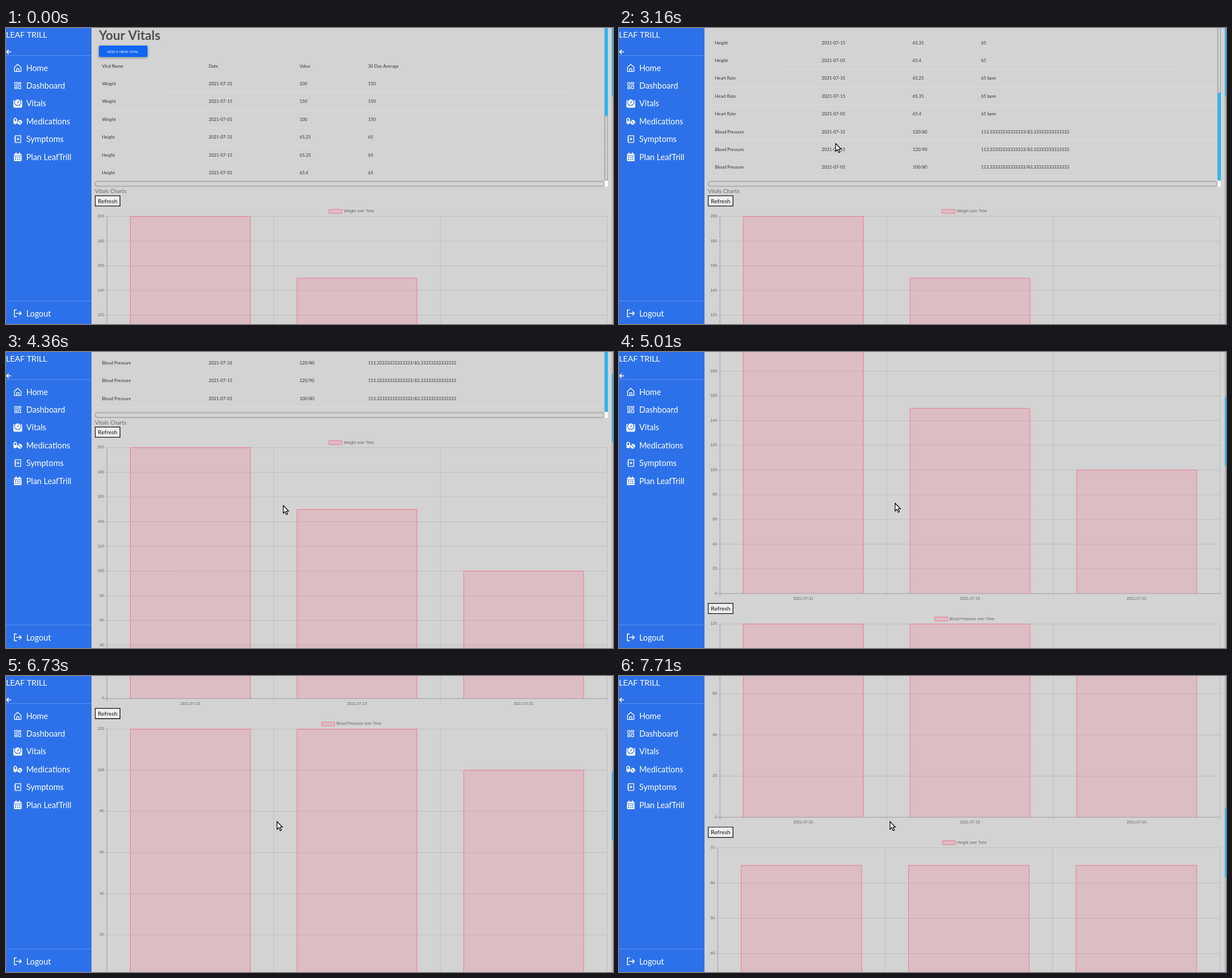
An HTML page with a canvas for the animation above (8000 ms loop, 1072 by 522 pixels).

```html
<!DOCTYPE html>
<html lang="en">
<head>
<meta charset="utf-8">
<title>Vitals</title>
<style>
html, body { margin: 0; width: 100%; height: 100%; overflow: hidden; background: #d3d3d3; }
canvas { display: block; }
</style>
</head>
<body>
<canvas id="stage" width="1072" height="522"></canvas>
<script>
const ctx = document.getElementById('stage').getContext('2d');
const LOOP = 8000, TICK = 66, NOTCH = 56, LIST_END = 198;
const BLUE = '#2d71ea', CYAN = '#29b8f2', PINK = '#f2708c', TINT = 'rgba(255,99,132,.2)', W = '#fff';
const UI = 'Lato, "Open Sans", sans-serif', CHART = '"Liberation Sans", Arial, sans-serif';

// Wheel turns: start, end, notches
const listWheel = [[2090, 2430, 2], [2630, 3160, 2]];
const pageWheel = [[3740, 5005, 6], [5005, 5110, 1], [5680, 6108, 3], [6265, 6730, 3], [7120, 7710, 5]];
// Pointer moves: start, end, x, y
const pointerStart = [1022, 503];
const pointerMoves = [[198, 960, 578, 275], [1023, 1490, 388, 204], [1700, 1960, 390, 199],
  [2430, 3160, 382, 203], [3310, 3800, 489, 270], [4360, 5010, 487, 266],
  [5280, 5540, 492, 264], [6140, 6730, 478, 256]];

const rows = [
  ['Weight', [200, 150, 100], '150'],
  ['Height', [65.25, 65.35, 65.4], '65'],
  ['Heart Rate', [65.25, 65.35, 65.4], '65 bpm'],
  ['Blood Pressure', ['120/80', '120/90', '100/80'], '113.33333333333333/83.33333333333333']
];
const dates = ['2021-07-31', '2021-07-15', '2021-07-01'];
const columns = [169.5, 358, 518.5, 639.5];
const charts = [
  ['Weight over Time', 178.3, 200, 20, [200, 150, 100]],
  ['Blood Pressure over Time', 178.3, 120, 20, [120, 120, 100]],
  ['Height over Time', 174.3, 70, 10, [65, 65, 65]]
];
const menu = ['Home', 'Dashboard', 'Vitals', 'Medications', 'Symptoms', 'Plan LeafTrill'];

const progress = (t, start, end) => Math.min(1, Math.max(0, (t - start) / (end - start)));
const scrolled = (wheel, t) =>
  wheel.reduce((sum, [start, end, n]) => sum + n * NOTCH * progress(t, start, end), 0);
const pointer = t => pointerMoves.reduce(([px, py], [start, end, x, y]) => {
  const f = progress(t, start, end);
  return [px + (x - px) * f, py + (y - py) * f];
}, pointerStart);

// y is the middle of the capitals
function text(str, x, y, size, color, { weight = 400, font = UI, align = 'left' } = {}) {
  ctx.font = `${weight} ${size}px ${font}`;
  ctx.fillStyle = color;
  ctx.textAlign = align;
  ctx.fillText(str, x, y + size * .36);
}

function box(x, y, w, h, fill, r = 0) {
  ctx.fillStyle = fill;
  ctx.beginPath();
  ctx.roundRect(x, y, w, h, r);
  ctx.fill();
}

function path(d, stroke, width, fill) {
  const p = new Path2D(d);
  if (fill) { ctx.fillStyle = fill; ctx.fill(p); }
  if (stroke) { ctx.strokeStyle = stroke; ctx.lineWidth = width; ctx.stroke(p); }
}

const line = (x1, y1, x2, y2, color, width = 1) => path(`M${x1} ${y1}L${x2} ${y2}`, color, width);

function track(x, y, w, h) {
  for (const width of [3, 1]) {
    ctx.strokeStyle = `rgba(0,0,0,${.04 + .12 / width})`;
    ctx.lineWidth = width;
    ctx.beginPath();
    ctx.roundRect(x + .5, y + .5, w - 1, h - 1, 4);
    ctx.stroke();
  }
}

function drawList(scroll) {
  ctx.save();
  ctx.beginPath();
  ctx.rect(157, 0, 906, 269.5);
  ctx.clip();
  ctx.save();
  ctx.translate(0, -scroll);
  text('Your Vitals', 164, 13, 22.6, '#4f4f4f', { weight: 700 });
  ctx.shadowColor = 'rgba(0,0,0,.35)';
  ctx.shadowBlur = 4;
  ctx.shadowOffsetY = 1.5;
  box(164, 31, 86, 20, '#1266f1', 2);
  ctx.shadowColor = 'transparent';
  text('ADD A NEW VITAL.', 207, 41.3, 6.4, W, { align: 'center' });
  const tableRow = (cells, i) => {
    const y = 66.8 + 31.4 * i;
    cells.forEach((cell, c) => text(cell, columns[c], y, 7.75, '#333'));
    line(157, y + 15.2, 1057, y + 15.2, '#dcdcdc');
  };
  tableRow(['Vital Name', 'Date', 'Value', '30 Day Average'], 0);
  rows.forEach(([name, values, mean], g) =>
    values.forEach((v, i) => tableRow([name, dates[i], v, mean], 1 + g * 3 + i)));
  ctx.restore();
  track(1057, -1, 6, 270);
  box(1057.5, scroll / LIST_END * 114, 5.5, 155.5, CYAN, 2);
  ctx.restore();
  track(157, 270, 900, 9.5);
  box(1057, 269.5, 6, 10, W);
}

function drawChart([title, left, max, step, values], top) {
  const right = 1061.5, height = 435.5, bottom = top + height, slot = (right - left) / 3;
  const shade = i => `rgba(0,0,0,${i ? .1 : .25})`;
  const label = (str, x, y, align) => text(str, x, y, 6.9, '#666', { font: CHART, align });

  box(157, top - 37, 45, 19.3, '#111');
  box(158.2, top - 35.8, 42.5, 16.8, '#efefef');
  text('Refresh', 179.5, top - 27.2, 10.3, '#111', { align: 'center' });

  ctx.font = `6.9px ${CHART}`;
  const x0 = 610.2 - (26 + ctx.measureText(title).width) / 2, y0 = top - 12.4;
  path(`M${x0} ${y0}h23v7h-23z`, PINK, .9, TINT);
  label(title, x0 + 26, top - 9.6);

  for (let v = 0; v <= max; v += step) {
    const y = bottom - height * v / max;
    line(left - 4.5, y, right, y, shade(v));
    label(v, left - 5.3, y - .8, 'right');
  }
  for (let i = 0; i < 4; i++) {
    const x = left + slot * i;
    line(x, top, x, bottom + 4.5, shade(i));
  }
  values.forEach((v, i) => {
    const x = left + slot * i, h = height * v / max;
    path(`M${x + slot * .14} ${bottom}v${-h}h${slot * .72}v${h}`, PINK, .9, TINT);
    label(dates[i], x + slot / 2, bottom + 8.7, 'center');
  });
}

// Each icon lives in a 16 by 16 box
const icons = [
  () => path('M2 7 7.7 1.8 13.5 7V14.5H2ZM5.8 14.5V9.5H9.7V14.5', W, 1.3),
  () => path('M2.5 2.5h4v5h-4zM9 2.5h4v3H9zM2.5 10.2h4v3h-4zM9 8.2h4v5H9z', W, 1.2),
  () => {
    box(0, 2, 15.5, 13.5, W, 2);
    path('M2 6a5.7 5.7 0 1 0 11.4 0a5.7 5.7 0 1 0-11.4 0', BLUE, 1.2, W);
    path('M7.3 8 9.5 3.5', BLUE, 1.3);
  },
  () => {
    path('M1 5a2.2 2.2 0 0 1 4.6 0v5a2.2 2.2 0 0 1-4.6 0z', W, 1.7);
    path('M1 7.5h4.6v3a2.2 2.2 0 0 1-4.6 0z', null, 0, W);
    path('M7 9.8a4.3 4.3 0 1 0 8.6 0a4.3 4.3 0 1 0-8.6 0', null, 0, W);
    path('M8 6.5 14.6 13', BLUE, 1.1);
  },
  () => path('M3.5 2h9.5v12H3.5zM1.5 5h3M1.5 8h3M1.5 11h3M8.3 5.5v5M5.8 8h5', W, 1.3),
  () => {
    box(1, 2.5, 13.5, 13, W, 1.5);
    for (const x of [3.8, 9.8]) box(x, .5, 2, 3, W);
    line(1, 5.6, 14.5, 5.6, BLUE, .9);
    for (let i = 0; i < 6; i++) box(3 + i % 3 * 3.7, 7.6 + (i > 2) * 3.7, 2, 2, BLUE);
  },
  () => path('M6 2H1.8V14H6M5 8H14M10.5 4.5 14 8 10.5 11.5', W, 1.5)
];

function drawSidebar() {
  box(0, 0, 151, 522, BLUE);
  text('LEAF TRILL', 0, 12.2, 14.2, W);
  path('M1.2 42H9M4.8 38.3 1.2 42 4.8 45.7', W, 1.6);
  for (const y of [48.5, 481.5]) line(0, y, 151, y, 'rgba(255,255,255,.22)');
  [...menu, 'Logout'].forEach((name, i) => {
    const y = i < menu.length ? 70.2 + 31.4 * i : 503.2;
    ctx.save();
    ctx.translate(13, y - 8);
    icons[i]();
    ctx.restore();
    text(name, 35.7, y + .3, 14.4, W);
  });
}

function drawPointer([x, y]) {
  ctx.save();
  ctx.translate(x, y);
  path('M.6 .8V14.3L3.8 11.3 6.2 16.8 8.4 15.8 6.1 10.5H10.2Z', '#000', 1.2, W);
  ctx.restore();
}

function draw(now) {
  // The screen refreshes in fixed ticks
  const t = Math.floor((now % LOOP + 12) / TICK) * TICK;
  const page = scrolled(pageWheel, t);
  box(0, 0, 1072, 522, '#d3d3d3');
  ctx.save();
  ctx.translate(0, -page);
  drawList(Math.min(LIST_END, scrolled(listWheel, t)));
  text('Vitals Charts', 157, 287.7, 10, '#666');
  charts.forEach((c, i) => drawChart(c, 332.3 + 489.3 * i));
  ctx.restore();
  box(1069.5, 0, 2.5, 522, 'rgba(0,0,0,.12)');
  box(1070, page * .2319, 2, 121, CYAN);
  drawSidebar();
  if (t >= pointerMoves[0][0]) drawPointer(pointer(t));
}

const begin = performance.now();
function frame() {
  draw(performance.now() - begin);
  requestAnimationFrame(frame);
}
frame();
</script>
</body>
</html>
```
